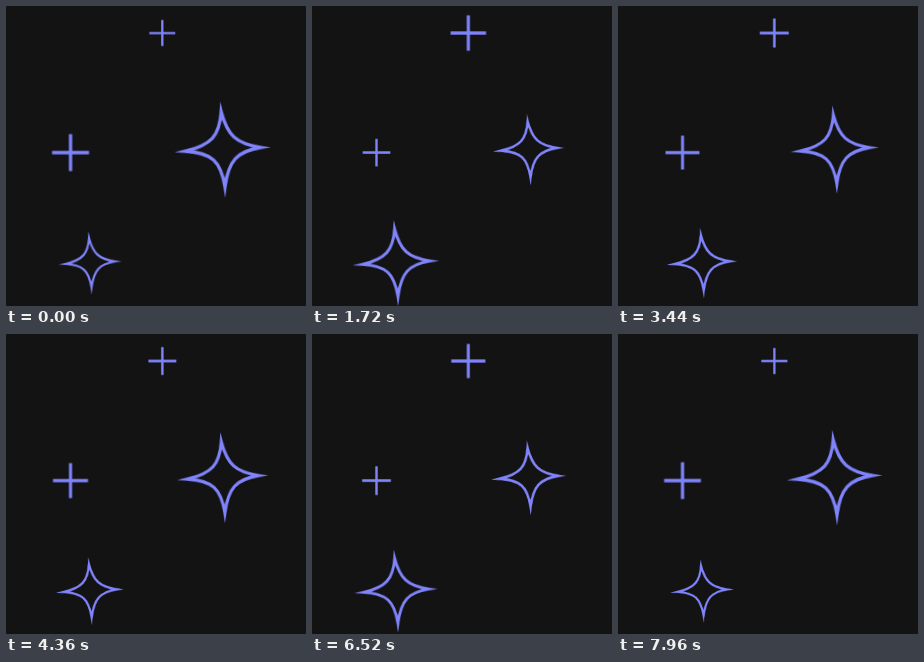
Write an HTML page that moves like this. It is 300x300 px and loops after 8000 ms.

```html
<!DOCTYPE html>
<html lang="en">
<head>
<meta charset="utf-8">
<title>Twinkling stars</title>
<style>
  html, body { margin: 0; width: 100%; height: 100%; overflow: hidden; background: #131313; }
  svg { display: block; width: 100%; height: 100%; }
  .shape {
    fill: none;
    stroke: #8084fb;
    stroke-width: 3.3;
    stroke-miterlimit: 12;
    animation: shrink 2s linear infinite alternate;
  }
  .grow { animation-direction: alternate-reverse; }
  @keyframes shrink {
    from { transform: scale(1); }
    to { transform: scale(.7); }
  }
</style>
</head>
<body>
<svg viewBox="0 0 300 300">
  <defs>
    <path id="plus" d="M-18.5 0H18.5M0 -18.5V18.5"/>
    <!-- The waist sits slightly up and right of the tips' centre. -->
    <path id="star" transform="rotate(-2.9)"
      d="M0 -37.6C5 -13.5 13.5 -5 37.6 0C13.5 3 5 11.5 0 37.6C-3 11.5 -11.5 3 -37.6 0C-11.5 -5 -3 -13.5 0 -37.6Z"/>
  </defs>
  <g transform="translate(64.5 146.6)"><g class="shape"><use href="#plus"/></g></g>
  <g transform="translate(156.3 27)"><g class="shape grow"><use href="#plus"/></g></g>
  <g transform="translate(217.1 143.3)"><g class="shape"><use href="#star"/></g></g>
  <g transform="translate(84.3 256.7) scale(.936)"><g class="shape grow"><use href="#star"/></g></g>
</svg>
</body>
</html>
```
